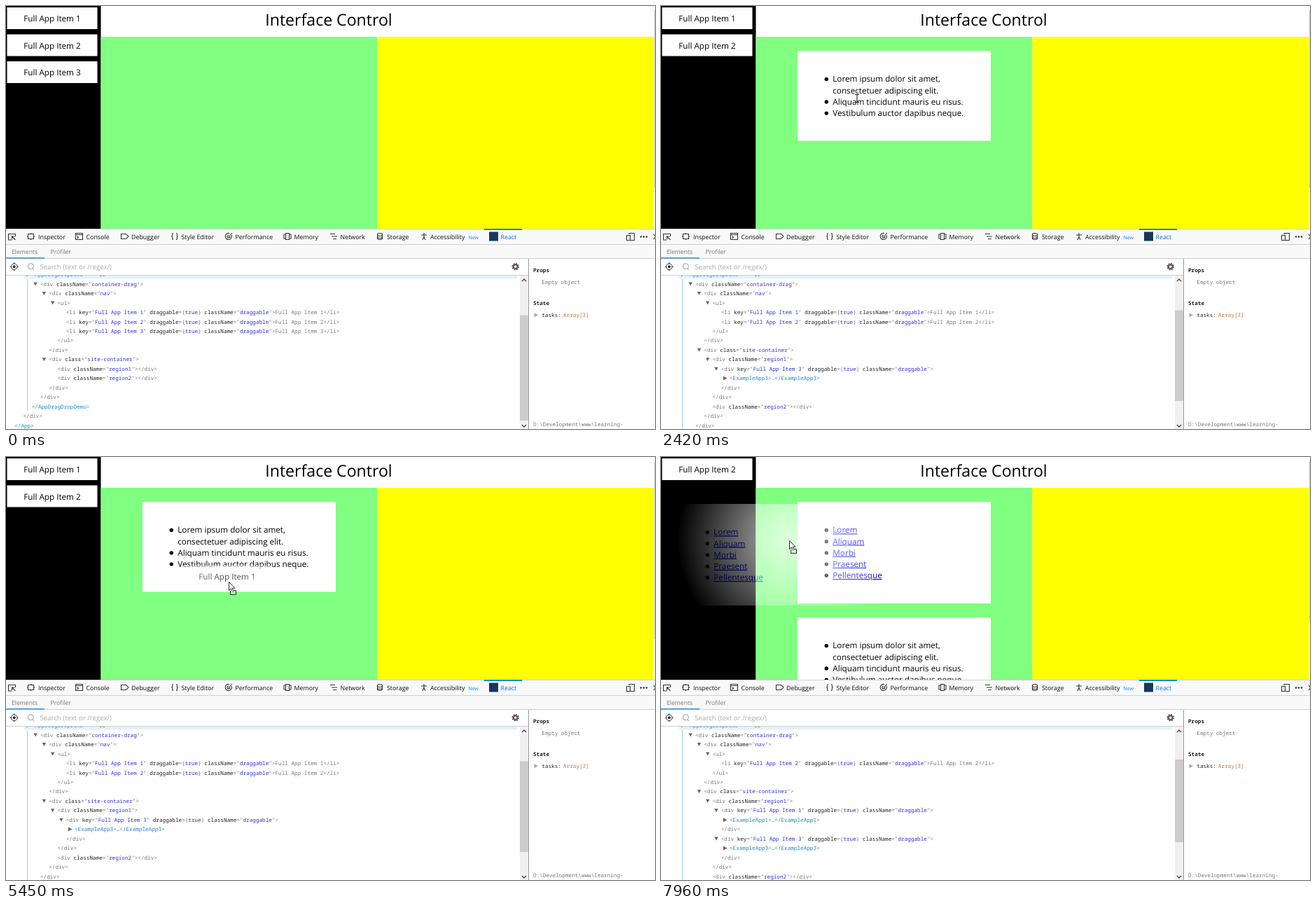
These frames come from a looping animation (927x604 px, 8000 ms). An HTML page:

```html
<!DOCTYPE html>
<html lang="en">
<head>
<meta charset="utf-8">
<title>Interface Control</title>
<style>
html, body { margin: 0; width: 100%; height: 100%; overflow: hidden; background: #fff; }
svg { display: block; width: 100vw; height: 100vh; }
text { font: 11.7px "Open Sans", "Noto Sans", sans-serif; white-space: pre; text-rendering: geometricPrecision; }
.mid { text-anchor: middle; }
.title { font-size: 23.1px; }
.tab { font-size: 8.85px; fill: #0c0c0d; }
.react { fill: #0a6fd8; }
.new { font-size: 7px; fill: #0a84ff; }
.sub { font-size: 8.65px; fill: #737373; }
.hint { font-size: 9.7px; fill: #aaa; }
.link { fill: #00e; text-decoration: underline; }
.mono { font: 7.67px "Noto Sans Mono", "DejaVu Sans Mono", monospace; fill: #777; }
.head { font-weight: bold; }
.attr { fill: #222; }
.val { fill: #2f2fe0; }
.comp { fill: #1e88c7; }
.count { fill: #c5703f; }
.light { fill: #fff; }
.icon { fill: none; stroke: #333; stroke-width: 1.1; }
</style>
</head>
<body>
<svg viewBox="0 0 927 604" preserveAspectRatio="none">
  <defs>
    <radialGradient id="fade"><stop stop-color="#fff" stop-opacity=".75"/><stop offset="1" stop-color="#fff" stop-opacity="0"/></radialGradient>
    <clipPath id="page"><rect width="927" height="318"/></clipPath>
    <clipPath id="tree"><rect y="385" width="746" height="219"/></clipPath>
  </defs>
  <rect width="927" height="604" fill="#fff"/>
  <g clip-path="url(#page)">
    <rect width="135.5" height="318"/>
    <rect x="135.5" y="44" width="395" height="274" fill="#80ff80"/>
    <rect x="530.5" y="44" width="395" height="274" fill="#ff0"/>
    <text class="title mid" x="461" y="28">Interface Control</text>
    <rect id="pageThumb" x="926" y="6" width="1" fill="#c4c4c4"/>
    <g id="views"></g>
    <g id="overlay">
      <rect width="135.5" height="119" fill="#1b410d"/>
      <rect width="131.5" height="115" fill="#557a9f"/>
      <g id="tinted"></g>
      <rect y="123" width="155" height="15" rx="2" fill="#2b2f3a"/>
      <rect x="19" y="126" width="1" height="9.5" fill="#777c86"/>
      <text class="mono light" x="4" y="133.3">ul</text>
      <text class="mono light" x="26" y="133.3">181.0500030517578px × 165px</text>
    </g>
  </g>
  <g id="tools"></g>
  <g id="trees" clip-path="url(#tree)"></g>
  <g id="ghosts"></g>
  <g id="cursor" stroke-linejoin="round">
    <path id="beam" fill="none" stroke="#222" stroke-width="1.1" d="M-3-5.5H3M0-5V5M-3 5.5H3"/>
    <path id="arrow" fill="#fff" stroke="#111" stroke-width=".9" d="M.5.5V12.6L3.2 10L5.2 14.4L7 13.5L5.1 9.3H9Z"/>
    <path id="box" fill="#ddd" fill-opacity=".6" stroke="#222" stroke-width=".9" d="M2.5 13V18.5H10.5V12.5H7"/>
  </g>
</svg>
<script>
const $ = id => document.getElementById(id);
const esc = s => s.replace(/&/g, '&amp;').replace(/</g, '&lt;');
const text = (x, y, s, cls = '') => `<text x="${x}" y="${y}" class="${cls}">${esc(s)}</text>`;
const rect = (x, y, w, h, fill) => `<rect x="${x}" y="${y}" width="${w}" height="${h}" fill="${fill}"/>`;
const show = (id, on) => $(id).style.display = on ? '' : 'none';

// Page
const item = (slot, n) => rect(1.5, 2 + 38.5 * slot, 129, 31, '#fff') +
  text(66, 22 + 38.6 * slot, 'Full App Item ' + n, 'mid');

const card = (top, height, lines, cls) => rect(195, top, 276, height, '#fff') +
  lines.map((line, i) => {
    const y = top + 44.3 + 16.2 * i, wrapped = line[0] === ' ';
    return (wrapped ? '' : `<circle cx="236.3" cy="${y - 3.8}" r="2.7"/>`) + text(245.3, y, line.trim(), cls);
  }).join('');

const lorem = top => card(top, 128.5, ['Lorem ipsum dolor sit amet,', ' consectetuer adipiscing elit.',
  'Aliquam tincidunt mauris eu risus.', 'Vestibulum auctor dapibus neque.']);
const links = () => card(64, 145, ['Lorem', 'Aliquam', 'Morbi', 'Praesent', 'Pellentesque'], 'link');

const pages = [
  item(0, 1) + item(1, 2) + item(2, 3),
  item(0, 1) + item(1, 2) + lorem(64),
  item(0, 2) + links() + lorem(229)
];
$('views').innerHTML = pages.map((p, i) => `<g id="view${i}">${p}</g>`).join('');
$('tinted').innerHTML = pages[0].replace(/#fff/g, '#9fc1de').replace(/<text/g, '<text fill="#4f779c"');

// Element tree
const paint = s => s.split(/(<\/?[A-Z]\w*>|"[^"]*"|\w+(?==)|true)/).map((part, i) => {
  if (i % 2 === 0) return esc(part);
  if (part[0] === '"') return `"<tspan class="val">${part.slice(1, -1)}</tspan>"`;
  const cls = part[0] === '<' ? 'comp' : part === 'true' ? 'val' : 'attr';
  return `<tspan class="${cls}">${esc(part)}</tspan>`;
}).join('');

// A row is its depth, a marker (v open, r closed) and its code
const drag = n => `key="Full App Item ${n}" draggable={true} className="draggable">`;
const li = n => `6 <li ${drag(n)}Full App Item ${n}</li>`;
const app = n => [`6v<div ${drag(n)}`, `7r<ExampleApp${n}>…</ExampleApp${n}>`, '6 </div>'];
const region = (n, apps) => apps.length
  ? [`5v<div className="region${n}">`, ...apps.flatMap(app), '5 </div>']
  : [`5 <div className="region${n}"></div>`];

const treeRows = (nav, placed) => ['3v<div className="container-drag">', '4v<div className="nav">', '5v<ul>',
  ...nav.map(li), '5 </ul>', '4 </div>', '4v<div class="site-container">',
  ...region(1, placed), ...region(2, []),
  '4 </div>', '3 </div>', '2 </AppDragDropDemo>', '1 </div>', '0 </App>'];

const openMark = (x, y) => `<path fill="#666" d="M${x - 9.5} ${y - 2.5}h5.4l-2.7 5z"/>`;
const closedMark = (x, y, fill = '#666') => `<path fill="${fill}" d="M${x - 9} ${y - 3}v6l5.5-3z"/>`;

const drawRow = (row, i) => {
  const x = 12.2 + 12.25 * row[0], y = 397 + 13.46 * i;
  const mark = row[1] === 'v' ? openMark(x, y) : row[1] === 'r' ? closedMark(x, y) : '';
  return `${mark}<text class="mono" x="${x}" y="${y + 2.7}">${paint(row.slice(2))}</text>`;
};
const drawTree = (nav, placed, guide, thumbTop, thumbHeight) =>
  rect(30, 390, 1, guide, '#a5cfe8') + treeRows(nav, placed).map(drawRow).join('') +
  rect(734, thumbTop, 12, thumbHeight, '#cdcdcd');

const trees = [
  drawTree([1, 2, 3], [], 188, 441.5, 150.5),
  drawTree([1, 2], [3], 214, 434.5, 129.5),
  drawTree([2], [1, 3], 214, 432, 118) + rect(734, 432, 12, 2.5, '#dcc0cf')
];
$('trees').innerHTML = rect(26, 384, 704, 5.5, '#e3f1fb') + openMark(36.7, 384) +
  `<text class="mono" x="36.7" y="386.2">${paint('<AppDragDropDemo>')} == $r</text>` +
  rect(734, 385, 12, 219, '#f0f0f0') +
  `<g id="hover">${rect(49, 498, 681, 13.5, '#e1f0fa')}${rect(55, 512, 1, 40, '#ddd')}</g>` +
  trees.map((t, i) => `<g id="tree${i}">${t}</g>`).join('') +
  '<path fill="none" stroke="#5b3d4a" stroke-width="1.4" d="M737 393l3-3l3 3M737 598l3 3l3-3"/>';

// Developer tools frame
const add = markup => $('tools').insertAdjacentHTML('beforeend', markup);
const icon = (x, y, d) => add(`<path class="icon" transform="translate(${x} ${y})" d="${d}"/>`);
const ring = (x, y, r, color, width = 1, dash = '') =>
  add(`<circle cx="${x}" cy="${y}" r="${r}" fill="none" stroke="${color}" stroke-width="${width}" stroke-dasharray="${dash}"/>`);
const dot = (x, y, r) => add(`<circle cx="${x}" cy="${y}" r="${r}" fill="#333"/>`);
const label = (...args) => add(text(...args));
const fill = (...args) => add(rect(...args));
const tab = (x, name, iconX, d) => { label(x, 333, name, 'tab'); icon(iconX, 329, d); };

fill(0, 318, 927, 286, '#fff');
fill(0, 318, 927, 42, '#f9f9fa');
for (const y of [318, 340, 360]) fill(0, y, 927, 1, '#d0d0d3');
fill(0, 384, 746, 1, '#d0d0d3');
fill(746, 361, 1, 243, '#999');
fill(683, 318, 54, 2, '#0a84ff');
fill(0, 359, 55, 1.6, '#3a96dd');

icon(8.5, 329, 'M0 5H-5V-3.5H5V0M5 5L0 0V4M0 0H4');
tab(46, 'Inspector', 35.5, 'M-4-3.5H4V3.5H-4ZM-5.5 0H-4M4 0H5.5M0-5V-3.5M0 3.5V5');
tab(114.5, 'Console', 104.5, 'M-5-4.5H5V4.5H-5ZM-5-2.5H5M-3-.5L-1 1.2L-3 3');
tab(179, 'Debugger', 169.5, 'M-5-3.5H2L5.5 0L2 3.5H-5Z');
const brace = 'q-1.5 0-1.3 2.3t-1.4 2.2q1.6 0 1.4 2.2t1.3 2.3';
tab(250.5, 'Style Editor', 241, `M-2-4.5${brace}`);
add(`<path class="icon" transform="translate(241 329) scale(-1 1)" d="M-2-4.5${brace}"/>`);
tab(327.5, 'Performance', 318, 'M4-2A4.6 4.6 0 1 1 1-4.5M2 0A2 2 0 1 1 0-2M0 .5L5-5');
tab(411.5, 'Memory', 402, 'M-2.5-4.5H2.5V4.5H-2.5ZM-2.5-3H-5V3H-2.5M2.5-3H5V3H2.5');
tab(477.5, 'Network', 468, 'M-5-3.5H2M-3 0H5M-1 3.5H4');
tab(544, 'Storage', 534, 'M-3.5-3.5q3.5-2 7 0v7q-3.5 2-7 0zM-3.5-1.5q3.5 2 7 0M-3.5 1.5q3.5 2 7 0');
tab(606, 'Accessibility', 597, 'M-4-2H4M0-5V1M-2 5L0 .5L2 5');
label(706.5, 333, 'React', 'tab react');
label(660.5, 333, 'New', 'new');
fill(690, 322.5, 13, 13, '#17375c');
icon(892, 329, 'M-2-3V-4.5H5.5V5.5H0M-5.5-1.5H-.5V5.5H-5.5Z');
icon(928, 329.5, 'M-3-3.5L3 3.5M-3 3.5L3-3.5');
for (const x of [907, 911, 915]) dot(x, 329.5, 1.3);

label(8, 354.2, 'Elements', 'sub');
label(63.5, 354.2, 'Profiler', 'sub');
label(48.3, 376, 'Search (text or /regex/)', 'hint');
ring(11.7, 372.2, 4.3, '#333');
dot(11.7, 372.2, 2);
icon(11.7, 372.2, 'M-6 0H-4M4 0H6M0-6V-4M0 4V6');
ring(35.3, 371.7, 4, '#999');
add('<path stroke="#999" d="M38 375l2 2.2"/>');
ring(727.7, 372.2, 3, '#6b5560', 2.4);
ring(727.7, 372.2, 4.6, '#6b5560', 1.6, '1.8 1.81');

label(753, 379.7, 'Props', 'mono attr head');
label(765.3, 396.7, 'Empty object', 'mono');
label(753, 426.7, 'State', 'mono attr head');
add(closedMark(763.5, 441.2, '#aaa'));
label(765.3, 443.7, 'tasks:', 'mono attr');
label(796, 443.7, 'Array[3]', 'mono count');
label(753, 599.5, 'D:\\Development\\www\\learning-', 'mono');

// Drag images fade out around the point where they are held
const held = [{ art: item(2, 3), x: 73, y: 101 }, { art: item(0, 1), x: 68, y: 25 }, { art: links(), x: 353, y: 116 }];
$('ghosts').innerHTML = held.map(({ art, x, y }, i) =>
  `<mask id="mask${i}" maskUnits="userSpaceOnUse" x="0" y="0" width="927" height="604">` +
  `<circle cx="${x}" cy="${y}" r="160" fill="url(#fade)"/></mask>` +
  `<g id="ghost${i}" mask="url(#mask${i})">${art}</g>`).join('');

// Pointer moves in even steps through points given as [step, x, y]
const STEP = 80, LOOP = 8000;
const moves = [];
const move = (start, ghost, ...points) => moves.push({ start, ghost, points });
move(290, null, [0, 730, 576], [2, 452, 464], [6, 150, 205], [10, 67, 88]);
move(1170, null, [0, 69, 94], [1, 73, 101]);
move(1710, 0, [0, 73, 101], [1, 129, 114], [5, 287, 133]);
move(2340, null, [0, 280, 131], [2, 280, 133], [10, 256, 200]);
move(3220, null, [0, 256, 201], [1, 256, 203]);
move(3450, null, [0, 256, 200], [5, 258, 126]);
move(4160, null, [0, 254, 124], [8, 68, 25]);
move(4950, 1, [0, 68, 25], [1, 85, 32], [6, 318, 178], [9, 313, 94]);
move(5760, null, [0, 313, 91]);
move(6690, null, [0, 315, 92], [7, 353, 116]);
move(7640, 2, [0, 353, 116], [1, 335, 118], [4, 183, 119]);

function pointerAt(t) {
  const current = moves.filter(m => m.start <= t).pop();
  if (!current) return null;
  const { start, ghost, points } = current;
  const last = points[points.length - 1];
  const k = Math.min(Math.floor((t - start) / STEP), last[0]);
  const b = points.find(p => p[0] >= k);
  const a = points[points.indexOf(b) - 1] || b;
  const u = a === b ? 0 : (k - a[0]) / (b[0] - a[0]);
  return { x: a[1] + (b[1] - a[1]) * u, y: a[2] + (b[2] - a[2]) * u, ghost: k > 0 ? ghost : null };
}

function render(t) {
  const state = t < 2340 ? 0 : t < 5760 ? 1 : 2;
  for (let i = 0; i < 3; i++) {
    show('view' + i, i === state);
    show('tree' + i, i === state);
  }
  $('pageThumb').setAttribute('height', state === 2 ? 230 : 254);
  show('overlay', t >= 370 && t < 610);
  show('hover', t >= 370 && t < 530);

  const p = pointerAt(t);
  held.forEach((h, i) => {
    const on = !!p && p.ghost === i;
    show('ghost' + i, on);
    if (on) $('ghost' + i).setAttribute('transform', `translate(${p.x - h.x} ${p.y - h.y})`);
  });
  show('cursor', p);
  if (!p) return;
  const dragging = p.ghost !== null;
  const onLabel = p.x > 24 && p.x < 108 && p.y < 106;
  const onList = state === 1 && p.x > 245 && p.x < 431 && p.y > 97 && p.y < 160;
  const beam = !dragging && (onLabel || onList);
  show('beam', beam);
  show('arrow', !beam);
  show('box', dragging);
  $('cursor').setAttribute('transform', `translate(${p.x} ${p.y})`);
}

const began = performance.now();
function tick() {
  render((performance.now() - began) % LOOP);
  requestAnimationFrame(tick);
}
tick();
</script>
</body>
</html>
```
